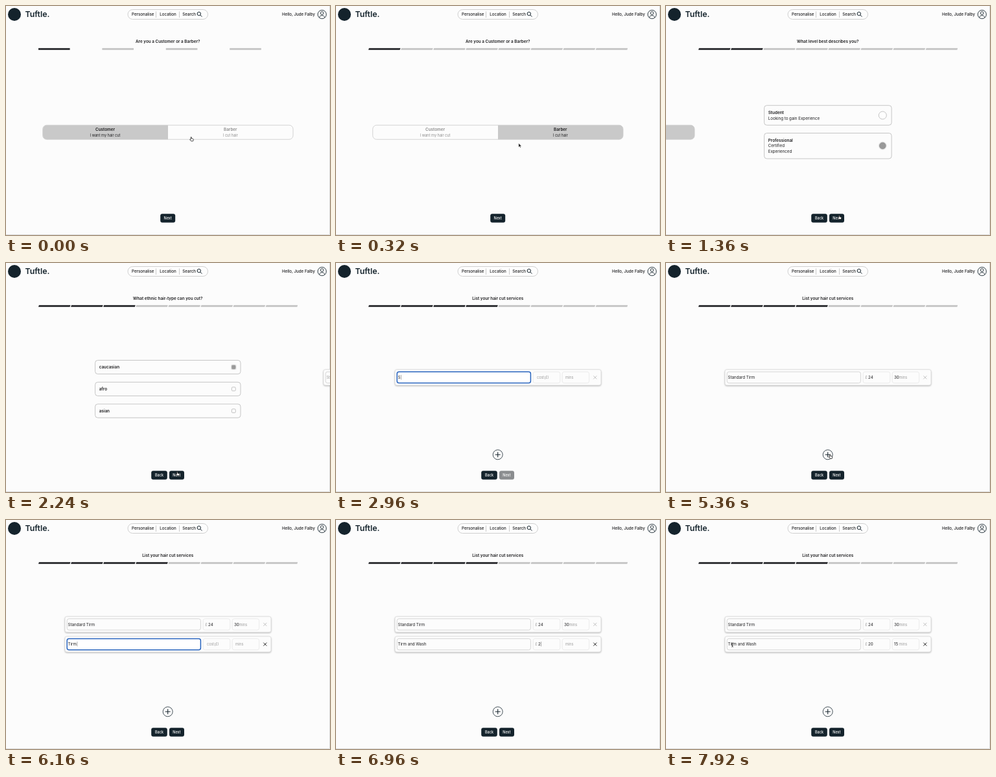
Write an HTML page that moves like this. It is 500 by 354 pixels and loops after 8000 ms.

```html
<!DOCTYPE html>
<html lang="en">
<head>
<meta charset="utf-8">
<title>Barber sign-up</title>
<style>
  html, body { margin: 0; width: 100%; height: 100%; overflow: hidden; background: #fcfcfc; }
  svg { display: block; width: 100vw; height: 100vh; }
  text { font: 400 6.2px Inter, "Open Sans", sans-serif; fill: #1c1c1e; white-space: pre; }
  .brand { font-size: 12.3px; font-weight: 600; fill: #14232c; }
  .nav { font-weight: 500; }
  .bold { font-size: 6.35px; font-weight: 600; }
  .small { font-size: 5.6px; }
  .hint { font-size: 5.5px; fill: #999; }
  .button { font-size: 5.5px; font-weight: 500; fill: #fff; }
  .mid { text-anchor: middle; }
  .muted { fill: #8c8c8c; }
  .caret { font-weight: 300; }
  .line { fill: none; stroke: #14232c; }
  .card { fill: #fcfcfc; stroke: #b8b8b8; stroke-width: .8; }
  .field { fill: #fcfcfc; stroke: #e4e4e4; stroke-width: .7; }
  .row { fill: #fcfcfc; stroke: #d8d8d8; stroke-width: .7; filter: drop-shadow(0 1px 1.3px #0004); }
</style>
</head>
<body>
<svg viewBox="0 0 500 354" preserveAspectRatio="none">
  <rect width="500" height="354" fill="#fcfcfc"/>
  <path d="M0 353.5H499.5V0" fill="none" stroke="#d4d4d4" stroke-width=".8"/>
  <circle cx="13" cy="13" r="10" fill="#14232c"/>
  <text class="brand" x="29.5" y="17.4">Tuftle.</text>
  <rect x="188" y="5.5" width="123.5" height="15" rx="7.5" fill="#fdfdfd" stroke="#c4c4c4" stroke-width=".8"/>
  <path d="M231.5 8.5v9.5M267.5 8.5v9.5" stroke="#aaa" stroke-width=".6"/>
  <text class="nav" x="194" y="15.3">Personalise</text>
  <text class="nav" x="237.3" y="15.3">Location</text>
  <text class="nav" x="272.3" y="15.3">Search</text>
  <g class="line"><circle cx="297.8" cy="12" r="2.7"/><path d="M299.8 14l2.6 2.6"/></g>
  <text class="nav" x="426" y="15.3">Hello,</text>
  <text class="nav" x="444.5" y="15.3">Jude Falby</text>
  <g class="line" stroke-width=".9">
    <circle cx="487.7" cy="13" r="6.6"/><circle cx="487.7" cy="11" r="2.3"/>
    <path d="M483.5 17.8c.6-4.2 7.8-4.2 8.4 0"/>
  </g>
  <g id="view"></g>
</svg>
<script>
const LOOP = 8000, SLIDE_WIDTH = 399, SLIDE_TIME = 320;
const PICK_BARBER = 160, PICK_LEVEL = 1200, PICK_HAIR = 2080, ADD_ROW = 5520;
const NEXT_CLICKS = [800, 1440, 2280];
const TITLES = [
  "Are you a Customer or a Barber?", "What level best describes you?",
  "What ethnic hair-type can you cut?", "List your hair cut services"
];

const every = (start, gap, count) => Array.from({ length: count }, (_, i) => start + gap * i);

// Each field gains one character per key time and holds focus over its span.
const SERVICES = [
  { name: { text: "Standard Tirm", keys: [2960, 3040, 3200, ...every(3360, 62, 10)], focus: [2800, 4000] },
    cost: { text: "24", keys: [4400, 4480], focus: [4000, 4640] },
    mins: { text: "30", keys: [4800, 4960], focus: [4640, 5120] } },
  { name: { text: "Tirm and Wash", keys: [...every(5920, 80, 4), ...every(6240, 70, 9)], focus: [5800, 6880] },
    cost: { text: "20", keys: [6960, 7120], focus: [6880, 7200] },
    mins: { text: "15", keys: [7360, 7440], focus: [7200, 7600] } }
];

// Pointer stops: arrive, leave, x, y, shape.
const STOPS = [
  [0, 240, 286.5, 205.5, "hand"], [640, 880, 254, 329, "hand"],
  [1140, 1220, 334, 217, "hand"], [1340, 1500, 268, 326.5, "hand"],
  [1960, 2100, 351, 162, "hand"], [2200, 2400, 265, 325.5, "hand"],
  [2720, 5080, 190, 178, "beam"], [5320, 5560, 254, 299, "hand"],
  [5760, 8000, 102.5, 193, "beam"]
];
const TYPING = [[2900, 5060], [5880, 7600]];
const SHAPES = {
  hand: `<path d="M-1.4 .8V-2.6q.7-1 1.3 0V-.6l2.3.5q.7.3.6 1.2L2.2 3.3H-.9L-2.8.9q.3-.9 1.4-.1z" fill="#fff" stroke="#111" stroke-width=".75"/>`,
  beam: `<path d="M-1.4-3.2q1.4 0 1.4 1V2.2q0 1-1.4 1M1.4-3.2Q0-3.2 0-2.2M0 2.2q0 1 1.4 1M-.8.6H.8" fill="none" stroke="#111" stroke-width=".7"/>`,
  arrow: `<path d="M-2-3.5v6.2l1.5-1.3 1 2.2 1-.5-1-2.1h2z" fill="#111" stroke="#fff" stroke-width=".5"/>`
};

const ease = p => p < .5 ? 2 * p * p : 1 - 2 * (1 - p) ** 2;
const progress = (t, start, length) => ease(Math.min(1, Math.max(0, (t - start) / length)));
const within = (t, [start, end]) => t >= start && t < end;
const past = (t, times) => times.filter(time => time <= t).length;

const text = (x, cy, content, style = "") => `<text x="${x}" y="${cy + 2.25}" class="${style}">${content}</text>`;
const box = (x, y, w, h, r, attrs) => `<rect x="${x}" y="${y}" width="${w}" height="${h}" rx="${r}" ${attrs}/>`;
const disc = (x, y, r, attrs) => `<circle cx="${x}" cy="${y}" r="${r}" ${attrs}/>`;

function progressBar(step, barber) {
  const pitch = barber ? 50.1 : 98.4, lean = barber ? .9 : 0;
  return every(0, 1, barber ? 8 : 4).map(i =>
    `<path d="M${50 + pitch * i + lean} 65.1h48.6l${-lean} 3h-48.6z" fill="${i <= step ? "#36373a" : "#c8c8c8"}"/>`).join("");
}

function button(x, width, label, enabled = true) {
  return box(x, 321.2, width, 13.6, 3, `fill="${enabled ? "#14232c" : "#8b8d8f"}"`) +
    text(x + width / 2, 327.9, label, "button mid");
}

function roleSlide(barber) {
  const fill = barber ? "M250 184.2h187a6 6 0 0 1 6 6v10a6 6 0 0 1-6 6H250z" : "M250 184.2H63a6 6 0 0 0-6 6v10a6 6 0 0 0 6 6H250z";
  const [left, right] = barber ? ["muted", ""] : ["", "muted"];
  return `<path d="${fill}" fill="#c9c9c9"/>` +
    box(56.7, 184.2, 386.3, 22, 6, 'fill="none" stroke="#c9c9c9" stroke-width=".8"') +
    text(153, 190.6, "Customer", "bold mid " + left) + text(153, 199.8, "I want my hair cut", "small mid " + left) +
    text(346.3, 190.6, "Barber", "bold mid " + right) + text(346.3, 199.8, "I cut hair", "small mid " + right);
}

function levelSlide(picked) {
  const radio = (cy, on) => on
    ? disc(334.3, cy, 6.5, 'fill="#e6e6e6"') + disc(334.3, cy, 4.9, 'fill="#999" stroke="#8a8a8a" stroke-width=".6"')
    : disc(334.3, cy, 6, 'fill="#fefefe" stroke="#c4c4c4"');
  return box(151.6, 153.7, 196.5, 30.5, 4, 'class="card"') + box(151.6, 196.5, 196.5, 39.5, 4, 'class="card"') +
    text(157.7, 164.5, "Student", "bold") + text(157.7, 173.4, "Looking to gain Experience") +
    text(157.7, 207.4, "Professional", "bold") + text(157.7, 216.2, "Certified") + text(157.7, 225.1, "Experienced") +
    radio(169, false) + radio(216, picked);
}

function hairSlide(picked) {
  return ["caucasian", "afro", "asian"].map((label, i) => {
    const cy = 161 + 33.8 * i, on = picked && i === 0;
    return box(137.6, cy - 10.6, 224.4, 21.2, 4, 'class="card"') + text(143.7, cy, label, "bold") +
      (on ? box(347, cy - 4.3, 8.6, 8.6, 2, 'fill="#e6e6e6"') : "") +
      box(348.4, cy - 2.9, 5.8, 5.8, 1.4, `fill="${on ? "#999" : "#fefefe"}" stroke="#aaa" stroke-width=".7"`);
  }).join("");
}

function serviceRow(t, cy, { name, cost, mins }, index) {
  const content = (x, field, emptyX, placeholder) => {
    const value = field.text.slice(0, past(t, field.keys));
    const focused = within(t, field.focus);
    const lastChange = Math.max(field.focus[0], ...field.keys.filter(key => key <= t));
    const caret = focused && (t - lastChange) % 480 < 240 ? '<tspan class="caret">|</tspan>' : "";
    return value ? text(x, cy, value + caret)
      : text(emptyX, cy, placeholder, "hint") + text(emptyX - 2.2, cy, caret);
  };
  const unit = (field, x, label) => past(t, field.keys) ? text(x, cy, label, "hint") : "";
  const ring = within(t, name.focus) ? 'fill="#fff" stroke="#2864be" stroke-width="1.5"' : 'class="field" style="stroke:#c6c6c6"';
  return box(91, cy - 12.2, 318, 24.2, 3, 'class="row"') +
    box(94.2, cy - 8.7, 206.2, 17.4, 3, ring) +
    box(304.2, cy - 8.7, 41.6, 17.4, 3, 'class="field"') + box(349.2, cy - 8.7, 41.4, 17.4, 3, 'class="field"') +
    content(95.6, name, 95.6, "Style") +
    content(312, cost, 310, "cost(£)") + unit(cost, 307.2, "£") +
    content(352, mins, 354, "mins") + unit(mins, 359.8, "mins") +
    `<path d="M397.3 ${cy - 2.5}l5 5m0-5l-5 5" stroke="${index ? "#111" : "#bbb"}" stroke-width=".9"/>`;
}

function serviceSlide(t) {
  const rows = t < ADD_ROW ? [176.9] : [161.4, 192.1];
  return rows.map((cy, i) => serviceRow(t, cy, SERVICES[i], i)).join("") +
    disc(249.7, 296.3, 7.5, 'class="line" stroke-width=".8"') +
    '<path class="line" stroke-width="1.1" d="M245.7 296.3h8M249.7 292.3v8"/>';
}

function pointer(t) {
  if (TYPING.some(span => within(t, span))) return "";
  const i = STOPS.findLastIndex(stop => stop[0] <= t);
  const [, leave, x, y, shape] = STOPS[i];
  const [arrive, , nextX, nextY] = STOPS[i + 1] || [LOOP, LOOP, x, y];
  const p = progress(t, leave, arrive - leave);
  return `<g transform="translate(${x + (nextX - x) * p} ${y + (nextY - y) * p})">${SHAPES[t > leave ? "arrow" : shape]}</g>`;
}

function render(t) {
  const step = past(t, NEXT_CLICKS), barber = t >= PICK_BARBER;
  const ready = [true, t >= PICK_LEVEL, t >= PICK_HAIR, t >= SERVICES[0].mins.keys[0]][step];
  const shift = NEXT_CLICKS.reduce((sum, click) => sum + progress(t, click, SLIDE_TIME), 0) * SLIDE_WIDTH;
  const slides = [roleSlide(barber), levelSlide(t >= PICK_LEVEL), hairSlide(t >= PICK_HAIR), serviceSlide(t)];
  return text(249.7, 54.5, TITLES[step], "bold mid") + progressBar(step, barber) +
    slides.map((slide, i) => `<g transform="translate(${i * SLIDE_WIDTH - shift})">${slide}</g>`).join("") +
    (step ? button(224.2, 24.6, "Back") + button(252, 23, "Next", ready) : button(238.2, 23, "Next")) +
    pointer(t);
}

const view = document.getElementById("view");
const start = performance.now();
function frame() {
  view.innerHTML = render((performance.now() - start) % LOOP);
  requestAnimationFrame(frame);
}
frame();
</script>
</body>
</html>
```
